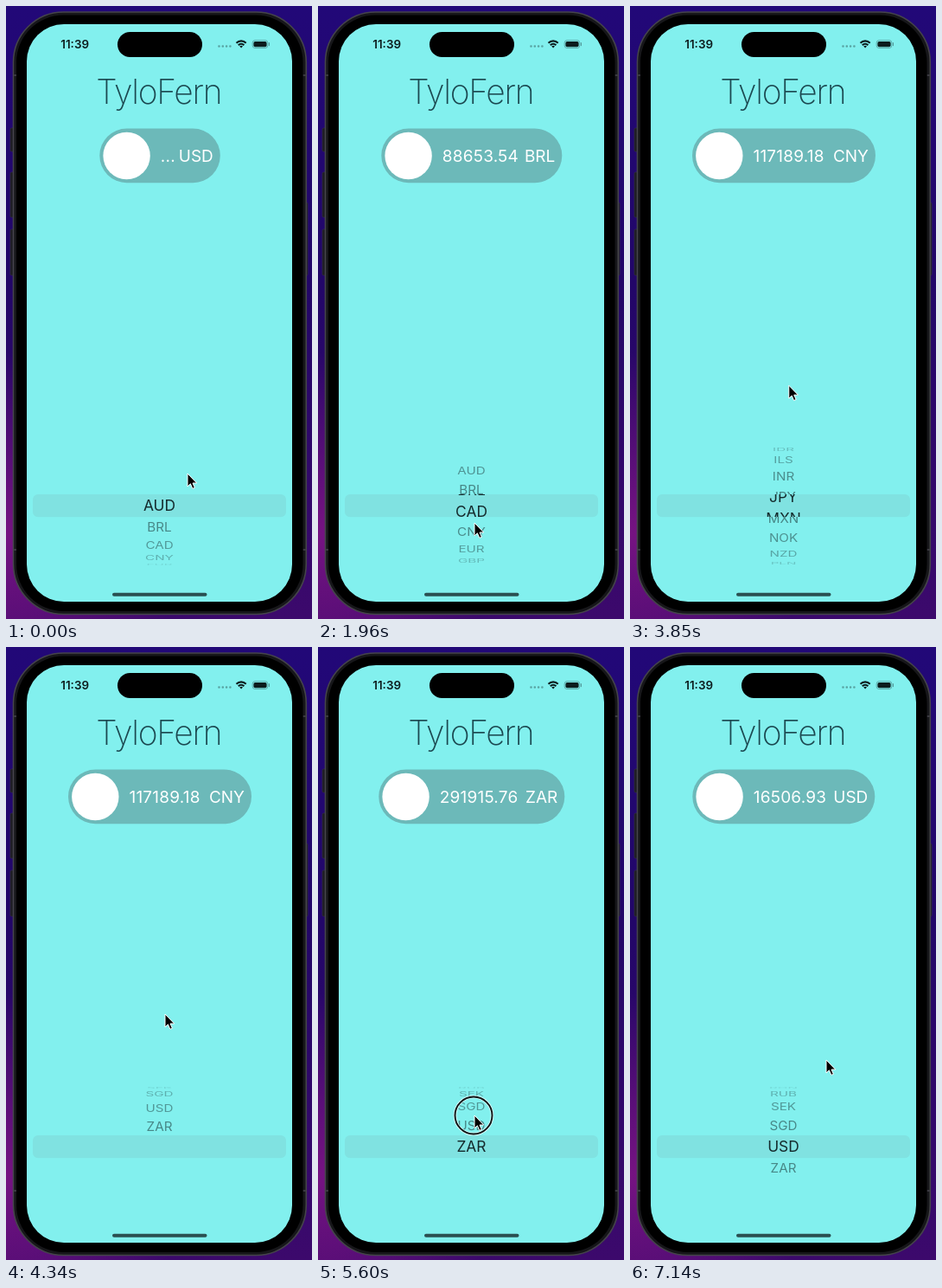
These frames come from a looping animation (354 by 708 pixels, 7.21 s). An HTML page:

```html
<!DOCTYPE html>
<html lang="en">
<head>
<meta charset="utf-8">
<title>Currency picker</title>
<style>
  html, body { margin: 0; width: 100%; height: 100%; overflow: hidden; background: #22086c; }
  svg { display: block; width: 100vw; height: 100vh; font-family: Inter, Roboto, "Liberation Sans", sans-serif; }
  .title { font-size: 39px; font-weight: 200; fill: #1b4850; text-anchor: middle; letter-spacing: -1.3px; }
  .clock { font-size: 13.4px; font-weight: 600; fill: #0c1c1d; }
  .pill text { font-size: 19px; fill: #fff; }
  #value { letter-spacing: .2px; }
  .far { font-size: 15.2px; }
  .near { font-size: 17.4px; }
  .far, .near { fill: #142a2c; text-anchor: middle; }
</style>
</head>
<body>
<svg viewBox="0 0 354 708">
  <defs>
    <linearGradient id="sky" x1="0" y1="0" x2="0" y2="1">
      <stop offset="0" stop-color="#220878"/>
      <stop offset=".45" stop-color="#220668"/>
      <stop offset="1" stop-color="#3c096c"/>
    </linearGradient>
    <radialGradient id="glow" gradientUnits="userSpaceOnUse" cx="0" cy="610" r="210">
      <stop offset="0" stop-color="#761382"/>
      <stop offset="1" stop-color="#761382" stop-opacity="0"/>
    </radialGradient>
    <clipPath id="band"><rect x="31" y="564" width="293" height="26"/></clipPath>
    <clipPath id="rest"><path d="M24 490h307v74H24zM24 590h307v74H24z"/></clipPath>
  </defs>

  <rect width="354" height="708" fill="url(#sky)"/>
  <rect width="354" height="708" fill="url(#glow)"/>

  <!-- phone -->
  <g fill="#1d1c24" stroke="#38363f" stroke-width=".6">
    <rect x="5" y="141" width="6" height="27" rx="1.5"/>
    <rect x="5" y="192" width="6" height="52" rx="1.5"/>
    <rect x="5" y="258" width="6" height="53" rx="1.5"/>
    <rect x="344" y="227" width="5" height="84" rx="1.5"/>
  </g>
  <rect x="8.5" y="7" width="338.8" height="695.5" rx="58" fill="#17171a" stroke="#45444b" stroke-width="1.6"/>
  <path d="M9 80h3M9 628h3M343.5 80h3.5M343.5 628h3.5" stroke="#3a3940" stroke-width="2"/>
  <rect x="12" y="10.5" width="331.5" height="688.5" rx="54.5" fill="#000"/>
  <rect x="24" y="21" width="307" height="667" rx="43" fill="#82f0ee"/>

  <!-- status bar -->
  <rect x="129" y="30" width="98" height="29" rx="14.5" fill="#000"/>
  <text class="clock" x="63.3" y="49">11:39</text>
  <path d="M246.5 46.5h14" stroke="#58a3a2" stroke-width="2.6" stroke-linecap="round" stroke-dasharray="0 4.3"/>
  <g fill="none" stroke="#0c1c1d" stroke-width="2.1">
    <path d="M266.5 42.7a8 8 0 0 1 11.2 0M268.8 45.2a4.8 4.8 0 0 1 6.6 0"/>
    <path d="M272.1 48.6l-1.9-2a2.7 2.7 0 0 1 3.8 0z" fill="#0c1c1d" stroke="none"/>
  </g>
  <rect x="285.2" y="39.7" width="17.6" height="8.8" rx="2.8" fill="none" stroke="#559c9c" stroke-width=".8"/>
  <rect x="286.4" y="40.9" width="15.2" height="6.4" rx="1.8" fill="#0c1c1d"/>
  <path d="M304.4 42.6v3" stroke="#559c9c" stroke-width="1.2" stroke-linecap="round"/>

  <text class="title" x="176.8" y="113">TyloFern</text>

  <g class="pill">
    <rect id="pill" y="141.5" height="62.7" rx="31.35" fill="#6cb9b9"/>
    <circle id="coin" cy="173" r="27.2" fill="#fff"/>
    <text id="value" y="180"></text>
    <text id="code" y="180" text-anchor="end"></text>
  </g>

  <rect x="31" y="564" width="293" height="26.3" rx="6" fill="#80e2e1"/>
  <g id="far" class="far" clip-path="url(#rest)"></g>
  <g id="near" class="near" clip-path="url(#band)"></g>

  <rect x="123" y="677.8" width="109.5" height="4" rx="2" fill="#2a5051"/>

  <g id="cursor">
    <g id="ring" fill="none">
      <circle cx="-1" r="21.5" stroke="#fff" stroke-opacity=".75" stroke-width="3.6"/>
      <circle cx="-1" r="21.5" stroke="#0b1415" stroke-width="1.9"/>
    </g>
    <path d="M0 0v15l3.4-3.2 2.4 5.6 2.6-1.1-2.4-5.3h4.7z" fill="#000" stroke="#fff" stroke-width="1" stroke-linejoin="round"/>
  </g>
</svg>

<script>
const LOOP = 7210, STEP = 70;
const MID = 577, RADIUS = 68.3, TURN = 21 * Math.PI / 180;
const codes = "AUD BRL CAD CNY EUR GBP HKD IDR ILS INR JPY MXN NOK NZD PLN RON RUB SEK SGD USD ZAR".split(" ");
const $ = id => document.getElementById(id);

const ease = {
  smooth: u => u * u * (3 - 2 * u),
  line: u => u,
  out: u => u * (2 - u)
};

// Each key: time, values, easing used to reach it.
const wheel = [
  [0, [0]], [850, [0]], [1170, [1]], [1746, [1]], [2066, [2]], [2750, [2]], [3080, [3]],
  [3520, [3]], [3780, [8], "line"], [4130, [20], "line"], [4340, [20.94], "out"], [4900, [20]],
  [5670, [20]], [5990, [19]]
];
const pointer = [
  [0, [210, 540]], [70, [210, 540]], [770, [182, 594.5]], [980, [182, 594.5]], [1470, [181, 597]],
  [1960, [181, 597]], [2450, [181, 599]], [3520, [181, 599]], [3920, [184, 424]],
  [4760, [184, 424]], [5320, [181, 541]], [6160, [181, 541]], [6860, [227, 478]],
  [7070, [227, 478]], [7140, [227, 477]]
];
const presses = [[700, 840], [1610, 1750], [2660, 2800], [3500, 3850], [5530, 5670]];
const rates = [
  [0, 108.3, 139.5, "...", "USD"],
  [1470, 73.3, 209, "88653.54", "BRL"],
  [2450, 72, 212, "22033.42", "CAD"],
  [3430, 72, 212, "117189.18", "CNY"],
  [5110, 70.3, 215, "291915.76", "ZAR"],
  [6370, 72.3, 211, "16506.93", "USD"]
];

function track(keys, t) {
  const i = keys.findIndex(k => k[0] > t);
  if (i < 0) return keys[keys.length - 1][1];
  const [t0, from] = keys[i - 1], [t1, to, kind = "smooth"] = keys[i];
  const u = ease[kind]((t - t0) / (t1 - t0));
  return from.map((v, n) => v + (to[n] - v) * u);
}

function makeRows(id, baseline) {
  return codes.map(code => {
    const row = document.createElementNS("http://www.w3.org/2000/svg", "text");
    row.textContent = code;
    row.setAttribute("y", baseline);
    return $(id).appendChild(row);
  });
}
const far = makeRows("far", 5.5), near = makeRows("near", 6.3);

function place(rows, pos, alpha) {
  rows.forEach((row, i) => {
    const angle = (i - pos) * TURN, depth = Math.cos(angle);
    const shown = Math.abs(angle) < Math.PI / 2;
    row.style.display = shown ? "" : "none";
    if (!shown) return;
    const y = MID + RADIUS * Math.sin(angle);
    row.setAttribute("transform", `translate(177.5 ${y}) scale(1 ${depth})`);
    row.setAttribute("opacity", alpha * depth ** .7);
  });
}

function showRate(t) {
  const [, x, w, value, code] = rates.filter(r => r[0] <= t).pop();
  $("pill").setAttribute("x", x);
  $("pill").setAttribute("width", w);
  $("coin").setAttribute("cx", x + 31.3);
  $("value").setAttribute("x", x + 70.5);
  $("value").textContent = value;
  $("code").setAttribute("x", x + w - 8);
  $("code").textContent = code;
}

function draw(now) {
  const t = Math.floor(now % LOOP / STEP) * STEP;
  const [pos] = track(wheel, t);
  place(far, pos, .55);
  place(near, pos, 1);
  showRate(t);
  $("cursor").setAttribute("transform", `translate(${track(pointer, t).join(" ")})`);
  $("ring").style.display = presses.some(([a, b]) => t >= a && t < b) ? "" : "none";
}

const start = performance.now();
function tick() {
  draw(performance.now() - start);
  requestAnimationFrame(tick);
}
tick();
</script>
</body>
</html>
```
